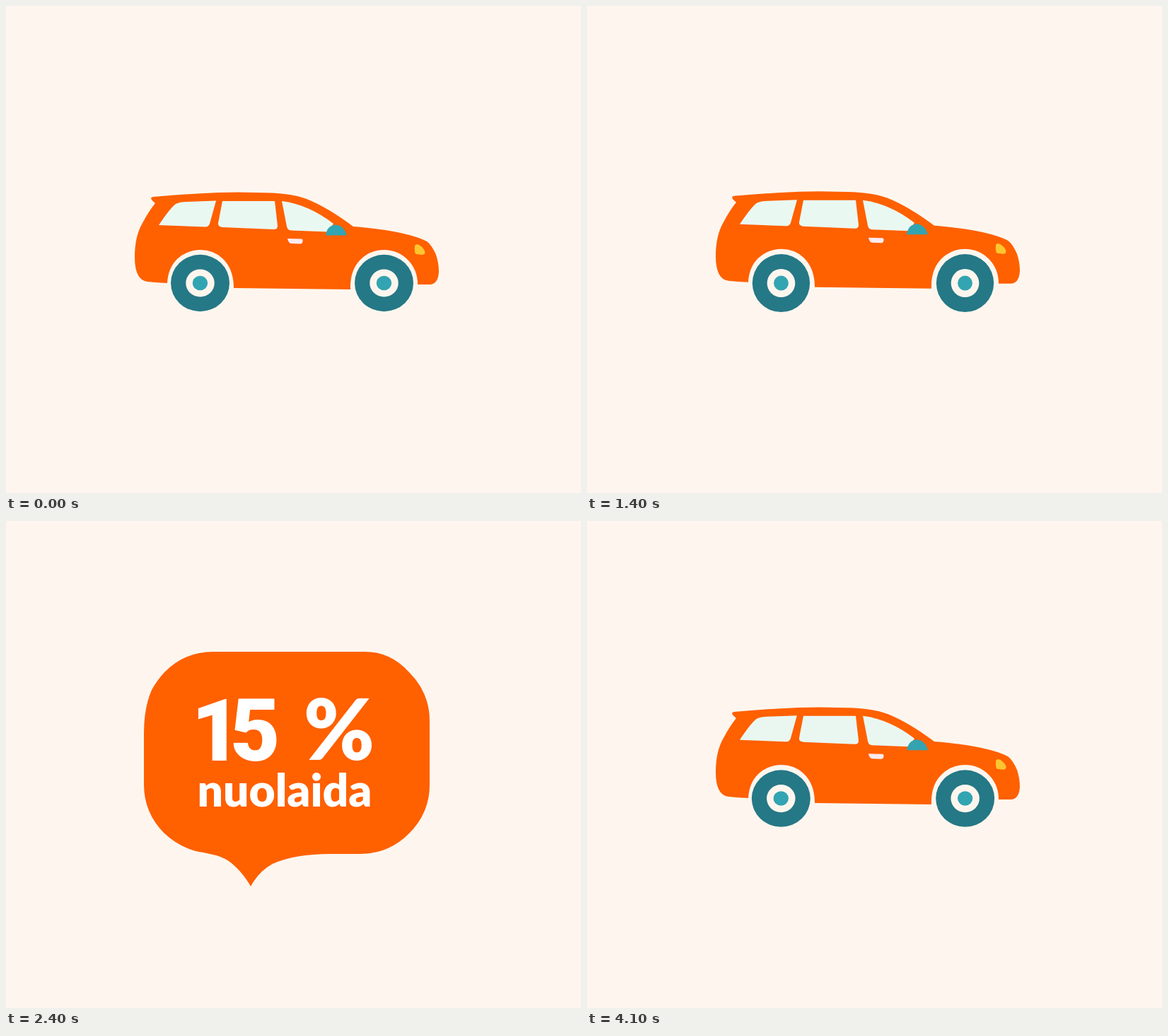
Recreate the animation shown at these times as an HTML page. Size 813 by 689 pixels, loop 4.2 s.

```html
<!DOCTYPE html>
<html lang="lt">
<head>
<meta charset="utf-8">
<title>15 % nuolaida</title>
<style>
  html, body { margin: 0; height: 100%; overflow: hidden; background: #fef6ee; }
  svg { display: block; width: 100vw; height: 100vh; }
  text { fill: #fff; font-weight: 900; }
  .digits { font: 900 122px Roboto, sans-serif; }
  .percent { font: 900 120px Lato, sans-serif; text-anchor: middle; }
  .word { font: 900 64px Lato, sans-serif; text-anchor: middle; }
  .glass { fill: #eaf8f2; }
</style>
</head>
<body>
<svg viewBox="0 0 813 689">
  <defs>
    <g id="wheel">
      <circle r="41" fill="#257886"/>
      <circle r="20" fill="#fef6ee"/>
      <circle r="10.5" fill="#33a4b2"/>
    </g>
  </defs>
  <path id="body" fill="#ff6000"/>

  <!-- data-shift: how far each part drifts while it fades out -->
  <path class="part glass" data-shift="-26 -58" d="M216 310Q232 286 240 280Q246 277 256 277L297 275.5L288 308Q286 313 281 312.5Z"/>
  <path class="part glass" data-shift="0 -60" d="M306 276L380 276L384 311Q384 316.5 378 316L306 313Q299 312 300 307Z"/>
  <path class="part glass" data-shift="16 -57" d="M390 276Q428 281 463 308L455 319.5L403 317.5Q398 317 397 312Z"/>
  <path class="part" data-shift="46 -29" fill="#33a4b2" d="M452 324.5Q454 310 467 309.5Q478 311 482 324.5Z"/>
  <path class="part" data-shift="-14 47" fill="#fdebf0" d="M398 329L418 329.5Q420 330 419.5 333Q419 336.5 416 336.5L403 336Q399 335 398 329Z"/>
  <path class="part" data-shift="29 -30" fill="#fdc62f" d="M578 339Q580 336 584 338Q592 343 592.5 349Q592 352 588 352L580 351Q577 350 578 339Z"/>
  <use class="wheel" href="#wheel" data-x="274.5" data-shift="-34 101"/>
  <use class="wheel" href="#wheel" data-x="534.5" data-shift="30 100"/>

  <g id="offer">
    <text class="digits" y="339" x="262 317">15</text>
    <text class="percent" x="471" y="338">%</text>
    <text class="word" x="394" y="404">nuolaida</text>
  </g>
</svg>
<script>
const LOOP = 4200, STEP = 100, MORPH = 900;
const OPEN_AT = 1362, CLOSE_AT = 3292, BOB_END = 1600, BOB_PERIOD = 800;

// Both outlines have the same commands, so they blend number by number.
const CAR = `M208 270Q240 267 270 265.5Q315 262.5 355 264Q402 264 425 273
  Q455 285 491 312Q565 318 595 333Q602 338 608 352Q612 364 612 376
  Q611 393 600 394Q591 394 582 394Q582 373 568 359Q554 345 534.5 345
  Q515 345 501 359Q486 374 487 401Q405 400 322 399Q322 372 306 357
  Q293 345 275 345Q256 345 242 358Q229 371 228 392Q213 391.5 200 390
  Q182 388 182 355Q182 326 193 307Q202 290 211 279Q201 271 208 270Z`;
const BUBBLE = `M224 214Q252 185 293 185Q340 185 380 185Q400 185 420 185
  Q436 185 451 185Q480 185 508 185Q544 185 570 214Q599 243 599 283
  Q599 304 599 324Q599 348 599 373Q599 413 570 442Q556 456 540 463
  Q522 471 501 471Q484 471 466 471Q410 470 377 485Q357 496 346 517
  Q336 499 320 485Q311 477 297 473Q288 471 279 469Q249 465 224 442
  Q195 413 195 373Q195 335 195 300Q195 264 206 239Q213 226 224 214Z`;

const NUMBER = /[\d.]+/g;
const bubbleNumbers = BUBBLE.match(NUMBER).map(Number);

function blendOutline(k) {
  let i = 0;
  return CAR.replace(NUMBER, n => (+n + (bubbleNumbers[i++] - n) * k).toFixed(2));
}

// cubic-bezier(.85, 0, .15, 1), solved by bisection
function ease(x) {
  if (x <= 0) return 0;
  if (x >= 1) return 1;
  let low = 0, high = 1, s;
  for (let i = 0; i < 30; i++) {
    s = (low + high) / 2;
    const sx = 3 * (1 - s) * s * (0.85 * (1 - s) + 0.15 * s) + s ** 3;
    if (sx < x) low = s; else high = s;
  }
  return s * s * (3 - 2 * s);
}

const body = document.getElementById('body');
const offer = document.getElementById('offer');
const parts = [...document.querySelectorAll('.part')];
const wheels = [...document.querySelectorAll('.wheel')];

function shiftOf(el, k) {
  return el.dataset.shift.split(' ').map(v => v * k);
}

function draw(t) {
  const p = ease((t - OPEN_AT) / MORPH) - ease((t - CLOSE_AT) / MORPH);
  const bob = t < BOB_END ? (1 - Math.cos(2 * Math.PI * t / BOB_PERIOD)) / 2 : 0;
  const lift = -2.4 * bob;

  body.setAttribute('d', blendOutline(p ** 1.43));
  body.setAttribute('transform', `translate(0 ${lift})`);

  for (const part of parts) {
    const [dx, dy] = shiftOf(part, p);
    part.setAttribute('transform', `translate(${dx} ${dy + lift})`);
    part.setAttribute('opacity', 1 - p);
  }
  for (const wheel of wheels) {
    const [dx, dy] = shiftOf(wheel, p);
    const squash = 0.04 * bob;
    wheel.setAttribute('transform',
      `translate(${+wheel.dataset.x + dx} ${392 + dy}) scale(${1.012 - squash} ${0.98 + squash})`);
    wheel.setAttribute('opacity', 1 - p);
  }

  offer.setAttribute('transform', `translate(394 329) scale(${0.6 + 0.4 * p}) translate(-394 -329)`);
  offer.setAttribute('opacity', p);
}

function tick() {
  draw(Math.floor(performance.now() % LOOP / STEP) * STEP);
  requestAnimationFrame(tick);
}
tick();
</script>
</body>
</html>
```
